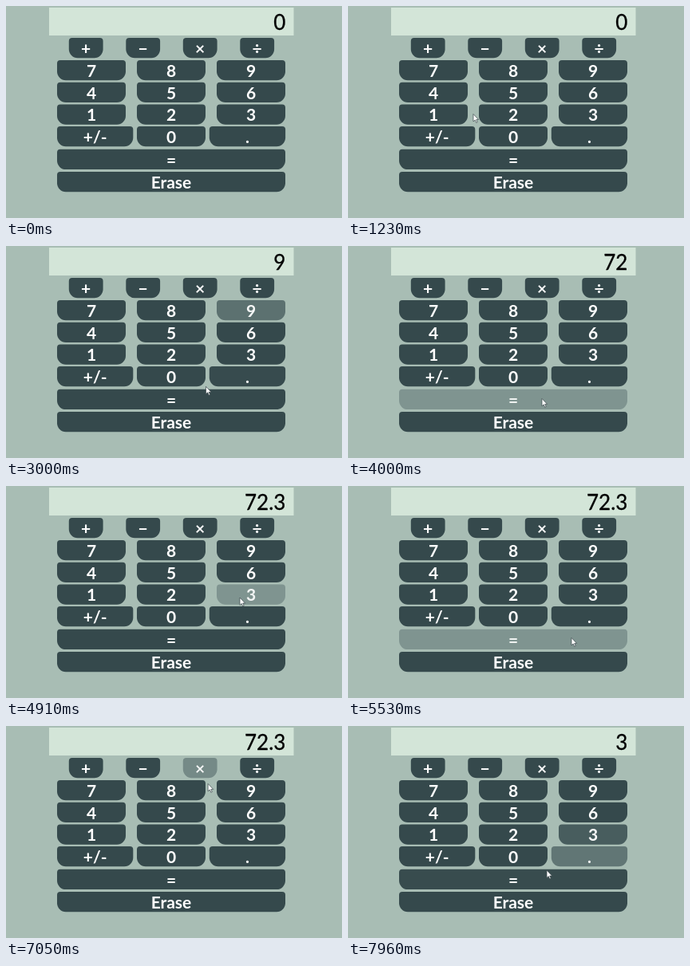
Write an HTML page that moves like this. It is 421 px wide and 266 px high and loops after 7.99 s.

```html
<!DOCTYPE html>
<html lang="en">
<head>
<meta charset="utf-8">
<title>Calculator</title>
<style>
html, body { margin: 0; width: 100%; height: 100%; overflow: hidden; background: #a8bdb4; }
svg { display: block; width: 100%; height: 100%; }
text { font-family: Lato, sans-serif; }
.label { font-size: 21px; font-weight: 700; fill: #fff; text-anchor: middle; }
.display { font-size: 26px; fill: #000; stroke: #000; stroke-width: .3px; stroke-linejoin: round; text-anchor: end; }
</style>
</head>
<body>
<svg viewBox="0 0 421 266">
  <rect width="421" height="266" fill="#a8bdb4"/>
  <rect x="54" y="2" width="306.5" height="35" fill="#d3e5d8"/>
  <text id="display" class="display" x="350.4" y="29.7">0</text>
  <g id="keys"></g>
  <path id="cursor" d="M0 0V9.4L2.2 7.5 3.7 10.9 5.2 10.2 3.7 7H6.6Z" fill="#fff" stroke="#39464a" stroke-width=".7"/>
</svg>
<script>
const LOOP = 7990, STEP = 10, FADE = 300, PRESS_DELAY = 270;
const NS = 'http://www.w3.org/2000/svg';
const $ = id => document.getElementById(id);
const BASE = [53, 73, 76], HOVER = [127, 148, 144];
const HEIGHT = 25.3, LEFT = 64, PITCH = 100, ROW = 27.7;

function add(parent, tag, attrs) {
  const el = document.createElementNS(NS, tag);
  for (const k in attrs) el.setAttribute(k, attrs[k]);
  return parent.appendChild(el);
}

// Slightly rounded on top, strongly rounded at the bottom
function keyShape(x, y, w) {
  const a = 4, b = 11, side = HEIGHT - a - b;
  return `M${x + a} ${y}h${w - 2 * a}q${a} 0 ${a} ${a}v${side}a${b} ${b} 0 0 1 ${-b} ${b}` +
    `h${2 * b - w}a${b} ${b} 0 0 1 ${-b} ${-b}v${-side}q0 ${-a} ${a} ${-a}z`;
}

const keys = {};
function addKey(label, x, y, w) {
  const shape = add($('keys'), 'path', { d: keyShape(x, y, w) });
  const text = add($('keys'), 'text', { class: 'label', x: x + w / 2, y: y + 20.9 });
  text.textContent = label;
  keys[label] = { x, y, w, shape, text, levels: [] };
}

[...'+−×÷'].forEach((c, i) => addKey(c, 78.8 + i * 71.5, 40, 42.8));
['789', '456', '123'].forEach((row, r) =>
  [...row].forEach((c, i) => addKey(c, LEFT + i * PITCH, 68 + r * ROW, 86)));
addKey('+/-', LEFT, 151, 95.3);
addKey('0', LEFT + PITCH, 151, 86);
addKey('.', 254.8, 151, 95.3);
addKey('=', LEFT, 179.8, 286);
addKey('Erase', LEFT, 208, 286);

// Pointer tour: it rests on a key, off its centre by dx, dy, from one time to another
const stops = [], presses = [];
function visit(label, dx, dy, from, to) {
  const k = keys[label];
  stops.push({ x: k.x + k.w / 2 + dx, y: k.y + HEIGHT / 2 + dy, from, to });
}
function press(label, dx, dy, from, to) {
  visit(label, dx, dy, from, to);
  presses.push({ label, time: from + PRESS_DELAY });
}

visit('Erase', 153, 26, 250, 250);
visit('9', -27, 4, 500, 500);
visit('1', 50, -.5, 900, 1230);
press('8', 15, 1, 1560, 1880);
press('×', -1, 3, 2000, 2250);
press('9', -7, -5, 2430, 2800);
press('=', 36, -1, 3060, 4000);
press('.', -12, 1, 4110, 4390);
press('3', -14, 4, 4490, 4930);
press('=', 73, -2, 5120, 5600);
visit('6', -23, 0, 5790, 5900);
visit('9', -21, 3, 6020, 6200);
press('×', 1, 2, 6530, 6900);
press('3', -22, 0, 7400, 7690);
visit('.', -34, 1, 7800, 7880);
visit('=', 38, -8, LOOP, LOOP);

function pointer(t) {
  const i = stops.findIndex(s => t <= s.to), b = stops[i], a = stops[i - 1];
  if (!a || t >= b.from) return [b.x, b.y];
  const u = (t - a.to) / (b.from - a.to), s = u * u * (3 - 2 * u);
  return [a.x + (b.x - a.x) * s, a.y + (b.y - a.y) * s];
}

// Hover levels along the whole loop
for (const key of Object.values(keys)) {
  let level = 0;
  for (let t = 0; t <= LOOP; t += STEP) {
    const [x, y] = pointer(t);
    const over = x >= key.x && x <= key.x + key.w && y >= key.y && y <= key.y + HEIGHT;
    level = Math.min(1, Math.max(0, level + (over ? STEP : -STEP) / FADE));
    key.levels.push(level);
  }
}

const operations = {
  '+': (a, b) => a + b,
  '−': (a, b) => a - b,
  '×': (a, b) => a * b,
  '÷': (a, b) => a / b
};

// What the display shows after every press up to time t
function reading(t) {
  let shown = '0', stored = 0, op = null, fresh = true;
  for (const { label, time } of presses) {
    if (time > t) break;
    if (label === '=') {
      if (op) shown = String(op(stored, +shown));
      op = null;
      fresh = true;
    } else if (operations[label]) {
      stored = +shown;
      op = operations[label];
      fresh = true;
    } else {
      shown = fresh && label !== '.' ? label : shown + label;
      fresh = false;
    }
  }
  return shown;
}

function draw(t) {
  const i = Math.floor(t / STEP);
  for (const { shape, text, levels } of Object.values(keys)) {
    const a = levels[i], b = levels[i + 1] ?? a;
    const v = a + (b - a) * (t / STEP - i);
    shape.setAttribute('fill', `rgb(${BASE.map((c, n) => Math.round(c + (HOVER[n] - c) * v))})`);
    text.setAttribute('fill-opacity', 1 - .1 * v);
  }
  $('display').textContent = reading(t);
  $('cursor').setAttribute('transform', `translate(${pointer(t)})`);
  $('cursor').setAttribute('visibility', t < stops[0].from ? 'hidden' : 'visible');
}

const start = performance.now();
function tick() {
  draw((performance.now() - start) % LOOP);
  requestAnimationFrame(tick);
}
draw(0);
requestAnimationFrame(tick);
</script>
</body>
</html>
```
